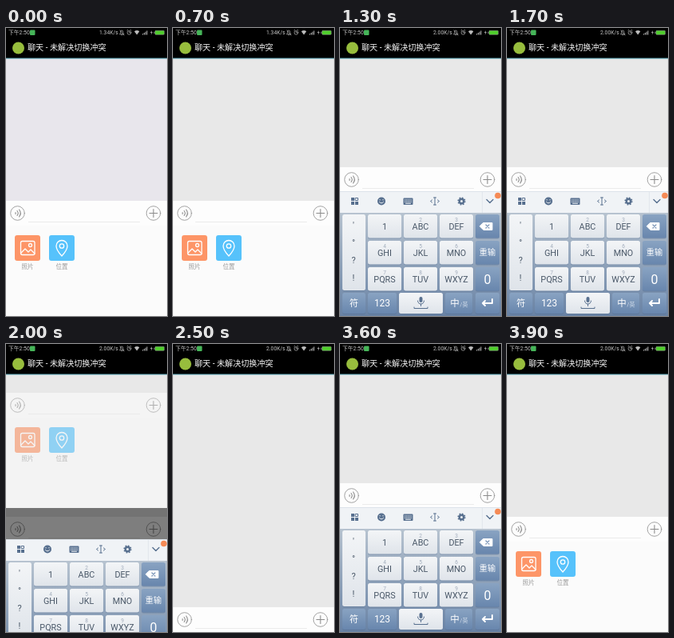
An HTML page for the animation above (4000 ms loop, 202 px wide and 360 px high).

```html
<!DOCTYPE html>
<html lang="zh">
<head>
<meta charset="utf-8">
<style>
html, body { margin: 0; width: 100%; height: 100%; overflow: hidden; background: #000; }
svg { display: block; width: 100vw; height: 100vh; }
text { font-family: Roboto, "Noto Sans CJK SC", "Noto Sans CJK", sans-serif; }
.status { font-size: 6.8px; fill: #c4c4c4; }
.mid { text-anchor: middle; }
.line { fill: none; stroke-linecap: round; stroke-linejoin: round; }
</style>
</head>
<body>
<svg viewBox="0 0 202 360">
  <defs>
    <linearGradient id="board" x2="0" y2="1"><stop stop-color="#b7c3d0"/><stop offset="1" stop-color="#6882a4"/></linearGradient>
    <linearGradient id="light" x2="0" y2="1"><stop stop-color="#f3f5f7"/><stop offset="1" stop-color="#dfe4ea"/></linearGradient>
    <linearGradient id="dark" x2="0" y2="1"><stop stop-color="#89a3c2"/><stop offset="1" stop-color="#6886ad"/></linearGradient>
    <g id="bar">
      <rect width="202" height="31" fill="#fdfdfd"/>
      <path d="M28 26.5H168" stroke="#ebebeb"/>
      <g class="line" stroke="#8c8c8c" stroke-width=".8">
        <circle cx="14.5" cy="15.5" r="8.8"/>
        <circle cx="185" cy="15.5" r="8.8"/>
        <path stroke-width="1.1" d="M12 14.5v2M14 12.5q2.4 3 0 6M16.5 11q3.6 4.5 0 9M180 15.5h10M185 10.5v10"/>
      </g>
    </g>
    <g id="panel">
      <rect width="202" height="114" fill="#fbfbfb"/>
      <path d="M0 .5H202" stroke="#ededed"/>
      <rect x="11" y="13" width="32" height="32" rx="3" fill="#fd9567"/>
      <rect x="54" y="13" width="32" height="32" rx="3" fill="#56c2fb"/>
      <g class="line" stroke="#fff" stroke-width="1.3">
        <rect x="18.5" y="20.5" width="17.5" height="17" rx="2"/>
        <path d="M19 35l5-5 4 4 3-3 5 5"/>
        <circle cx="30.5" cy="25.5" r="2"/>
        <path d="M70 39q-7-7.500-7-12.500a7 7 0 0 1 14 0q0 5-7 12.500z"/>
        <circle cx="70" cy="26.5" r="2.7"/>
      </g>
      <g class="mid" font-size="7.6" fill="#999"><text x="27" y="55">照片</text><text x="70" y="55">位置</text></g>
    </g>
  </defs>

  <g>
    <rect y="38" width="202" height="322" fill="#e8e8e8"/>
    <use id="underPanel" href="#panel" y="246"/><use id="underBar" href="#bar"/>
    <rect y="38" width="202" height="322" opacity=".5"/>
  </g>
  <rect id="chat" y="38" width="202"/>
  <g id="controls"><use id="mainPanel" href="#panel"/><use id="mainBar" href="#bar"/></g>

  <g id="keyboard">
    <rect y="204" width="202" height="28" fill="#f0f3f6"/>
    <path d="M0 204.5H202" stroke="#dde3ea"/>
    <rect y="231" width="202" height="129" fill="url(#board)"/>
    <g fill="#58708f">
      <path d="M14 212h4v4h-4zM14 217h4v4h-4zM19 217h4v4h-4z"/>
      <circle cx="52" cy="216.5" r="5"/>
      <rect x="79.5" y="212.5" width="12" height="8.5" rx="1"/>
      <circle cx="152.5" cy="216.5" r="3.9"/>
    </g>
    <g class="line" stroke="#58708f">
      <rect x="19.5" y="212.5" width="3" height="3"/>
      <path d="M117.5 212h3M119 212v9M117.5 221h3M115.5 215l-2 1.500 2 1.500M122.5 215l2 1.500-2 1.500"/>
      <circle cx="152.5" cy="216.5" r="4.2" stroke-width="1.8" stroke-dasharray="1.6 1.7" stroke-linecap="butt"/>
      <path d="M184 214.5l4 4 4-4" stroke-width="1.4"/>
    </g>
    <path d="M178.5 205v26" stroke="#e2e7ed"/>
    <circle cx="152.5" cy="216.5" r="1.5" fill="#f0f3f6"/>
    <g class="line" stroke="#f0f3f6">
      <path d="M49.5 217.5q2.5 3 5 0M50 214.5v.5M54 214.5v.5M82.5 219.3h6"/>
      <path d="M81 215h9M81 217.3h9" stroke-linecap="butt" stroke-dasharray="1.2 .7"/>
    </g>
    <g id="keys"></g>
    <g class="line" stroke="#fff">
      <path d="M180 243.5h11v9h-11l-4.500-4.500z" fill="#fff"/>
      <path d="M183 246l4 4M187 246l-4 4" stroke="#7893b6" stroke-width="1.2"/>
      <path d="M191 339v5h-12M182 341l-3 3 3 3" stroke-width="2"/>
    </g>
    <rect x="99.5" y="336" width="4" height="7" rx="2" fill="#58708f"/>
    <path class="line" d="M97.5 341q.5 4 4 4t4-4M101.5 345v2.500M93 349v1.500h17v-1.500" stroke="#58708f"/>
    <circle cx="198" cy="209.5" r="3.8" fill="#f58a55"/>
  </g>

  <rect width="202" height="38"/>
  <rect y="37.5" width="202" height="1" fill="#5fa9bb"/>
  <circle cx="15.5" cy="25" r="7.5" fill="#97bd3d"/>
  <text x="27" y="27.8" font-size="10.1" fill="#f5f5f5">聊天 - 未解决切换冲突</text>
  <text class="status" x="3" y="8.2">下午2:50</text>
  <rect x="30" y="2.5" width="6.5" height="6.5" rx="1" fill="#46b559"/>
  <text class="status" id="speed" x="117" y="8.2"></text>
  <g class="line" stroke="#bbb" stroke-width=".7">
    <path d="M142.8 7.500q1-1 1-2.500 0-2 1.500-2t1.500 2q0 1.500 1 2.500zM144.800 8.700h1M143 3l5 6"/>
    <circle cx="154.5" cy="5.8" r="2.4"/><path d="M154.5 4.500v1.300h1M152 2.900l.8-.7M157 2.900l-.8-.7"/>
  </g>
  <path d="M161 4.2q3.200-2.600 6.400 0l-3.200 4.300z" fill="#bbb"/>
  <path d="M171.5 8.500V7.300M173.300 8.500V6M175.100 8.500V4.700M176.900 8.500V3.400" stroke="#bbb"/>
  <path d="M183 3l-2 3h1.500l-.7 2.500 2.200-3.200h-1.500z" fill="#bbb"/>
  <rect x="187" y="3.3" width="11.5" height="5" rx=".8" fill="#4fcf2c" stroke="#999" stroke-width=".5"/>
  <path d="M186 4.8v2" stroke="#999"/>
</svg>
<script>
const $ = id => document.getElementById(id);
const set = (id, attrs) => Object.entries(attrs).forEach(([k, v]) => $(id).setAttribute(k, v));
const LOOP = 4000, FULL = 360, RESIZED = 205, HIDDEN = 160;

const label = (x, y, size, fill, s) =>
  `<text class="mid" x="${x}" y="${y}" font-size="${size}" fill="${fill}">${s}</text>`;
const key = (x, y, w, h, tone, s = "", size = 10) =>
  `<rect x="${x}" y="${y + 1}" width="${w}" height="${h}" rx="2.5" fill="#4d6789" opacity=".4"/>` +
  `<rect x="${x}" y="${y}" width="${w}" height="${h}" rx="2.5" fill="url(#${tone})"/>` +
  label(x + w / 2, y + h / 2 + size * .36, size, tone === "dark" ? "#fff" : "#4a5868", s);

const letters = ["", "ABC", "DEF", "GHI", "JKL", "MNO", "PQRS", "TUV", "WXYZ"];
let keys = key(3, 233, 29, 95, "light");
["'", "°", "?", "!"].forEach((s, i) => keys += label(17, 250 + i * 22, 11, "#4a5868", s));
letters.forEach((s, i) => {
  const x = 35 + i % 3 * 45, y = 233 + Math.floor(i / 3) * 33;
  keys += key(x, y, 42, 29.5, "light", s || "1", 10.8);
  if (s) keys += label(x + 21, y + 8.5, 6.6, "#a3aebd", i + 1);
});
[["", 10], ["重输", 10.2], ["0", 16]].forEach(([s, size], i) =>
  keys += key(170, 233 + i * 33, 30, 29.5, "dark", s, size));
keys += key(3, 331, 29, 26, "dark", "符", 11) + key(35, 331, 36, 26, "dark", "123", 12) +
  key(74, 331, 55, 26, "light") + key(132, 331, 34, 26, "dark") + key(170, 331, 30, 26, "dark") +
  label(144, 348, 11.5, "#fff", "中") + label(155.5, 348, 7, "#d3deeb", "/英");
$("keys").innerHTML = keys;

// each step: time, layout bottom, panel shown, keyboard offset, opacity of the controls
const showKeyboard = t => [
  [t, FULL, false, HIDDEN, 1],
  [t + 100, RESIZED, false, 75, 1],
  [t + 200, RESIZED, false, 15, 1],
  [t + 300, RESIZED, false, 0, 1]
];
const showPanel = t => [
  [t, RESIZED, true, 40, .6],
  [t + 100, FULL, true, 148, 1],
  [t + 200, FULL, true, HIDDEN, 1]
];
const steps = [
  [0, FULL, true, HIDDEN, 1],
  ...showKeyboard(900), ...showPanel(2000),
  ...showKeyboard(2500), ...showPanel(3700)
];

function render(now) {
  const t = now % LOOP;
  const [, bottom, panel, offset, opacity] = steps.findLast(s => s[0] <= t);
  const barHeight = panel ? 144 : 31, visibility = panel ? "visible" : "hidden";
  set("chat", { height: bottom - 38, fill: t < 300 ? "#e8e6ec" : "#e8e8e8" });
  set("controls", { opacity });
  set("mainBar", { y: bottom - barHeight });
  set("mainPanel", { y: bottom - barHeight + 30, visibility });
  set("underBar", { y: FULL - barHeight });
  set("underPanel", { visibility });
  set("keyboard", { transform: `translate(0 ${offset})` });
  $("speed").textContent = t < 1000 ? "1.34K/s" : "2.00K/s";
}

function tick() {
  render(performance.now());
  requestAnimationFrame(tick);
}
tick();
</script>
</body>
</html>
```
